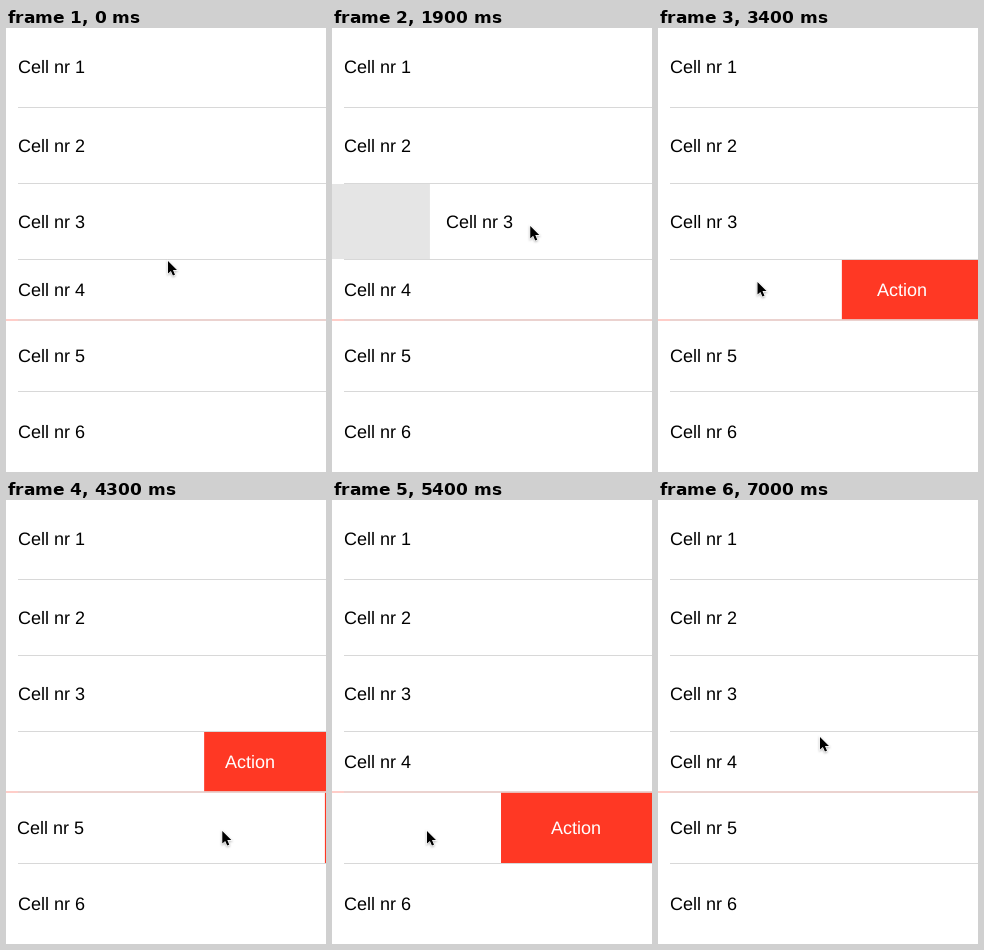
An HTML page for the animation above (7100 ms loop, 320 by 444 pixels).

```html
<!DOCTYPE html>
<html lang="en">
<head>
<meta charset="utf-8">
<title>Swipeable cells</title>
<style>
  html, body { margin: 0; width: 100%; height: 100%; overflow: hidden; background: #fff; }
  svg { display: block; width: 320px; height: 444px; }
  text { font: 18px "Liberation Sans", Arial, sans-serif; text-rendering: geometricPrecision; }
  .label { fill: #000; }
  .action { fill: #fff; }
  #lines rect { fill: #d8d8d8; }
  #cursor { filter: drop-shadow(0 1px 1px rgba(0, 0, 0, .3)); }
</style>
</head>
<body>
<svg viewBox="0 0 320 444">
  <g id="rows"></g>
  <g id="lines"></g>
  <path id="cursor" d="M0 0V12.6L2.9 9.9L4.9 14.6L7 13.7L5 9.1H9Z"
        fill="#000" stroke="#fff" stroke-width="1.2" paint-order="stroke"/>
</svg>
<script>
const LOOP = 7100, STEP = 100, SPRING_RATE = 11.5;
const borders = [-3, 79, 155, 231, 291.5, 363, 443];

const swipes = [
  { row: 2, color: '#e5e5e5', target: 102, open: 1098, close: 2610 },
  { row: 3, color: '#ff3824', target: -151, open: 3060, close: 4230, label: 'Action' },
  { row: 4, color: '#ff3824', target: -151, open: 4289, close: 5570, label: 'Action' }
];

// The pointer eases between these stops.
const stops = [
  { t: 0, x: 162, y: 233 },
  { t: 800, x: 97.5, y: 197 },
  { t: 1300, x: 189, y: 197 },
  { t: 1600, x: 189, y: 197 },
  { t: 2400, x: 219, y: 200 },
  { t: 2900, x: 230, y: 254 },
  { t: 3400, x: 99.5, y: 254 },
  { t: 4100, x: 225, y: 331 },
  { t: 4200, x: 225, y: 331 },
  { t: 4800, x: 95, y: 331 },
  { t: 5500, x: 95, y: 331 },
  { t: 6300, x: 188, y: 316 },
  { t: 7000, x: 162, y: 237 }
];

function add(parent, name, attrs, text = '') {
  const el = document.createElementNS('http://www.w3.org/2000/svg', name);
  for (const key in attrs) el.setAttribute(key, attrs[key]);
  el.textContent = text;
  return parent.appendChild(el);
}

const rows = document.getElementById('rows');
const lines = document.getElementById('lines');
const cursor = document.getElementById('cursor');

function addRow(i) {
  const top = borders[i] + 1, bottom = borders[i + 1], height = bottom - top;
  const baseline = Math.round((borders[i] + bottom) / 2) + 7;
  const swipe = swipes.find(s => s.row === i);
  if (swipe) {
    add(rows, 'rect', { y: top, width: 320, height, fill: swipe.color });
    if (swipe.label) add(rows, 'text', { x: 219, y: baseline, class: 'action' }, swipe.label);
  }
  const cell = add(rows, 'g', {});
  add(cell, 'rect', { x: -4, y: top, width: 324, height, fill: '#fff' });
  add(cell, 'text', { x: 12, y: baseline, class: 'label' }, `Cell nr ${i + 1}`);
  if (i < 5) add(lines, 'rect', { x: 12, y: bottom, width: 308, height: 1 });
  return cell;
}

const cells = Array.from({ length: 6 }, (_, i) => addRow(i));

// Critically damped spring, 0 to 1.
function spring(ms) {
  const p = Math.max(0, ms) / 1000 * SPRING_RATE;
  return 1 - (1 + p) * Math.exp(-p);
}

function pointerAt(t) {
  const i = Math.max(1, stops.findIndex(s => s.t >= t));
  const a = stops[i - 1], b = stops[i];
  const k = (1 - Math.cos(Math.PI * (t - a.t) / (b.t - a.t))) / 2;
  return [a.x + (b.x - a.x) * k, a.y + (b.y - a.y) * k];
}

function draw(now) {
  const t = Math.floor(now % LOOP / STEP) * STEP;
  for (const s of swipes) {
    const amount = spring(t - s.open) * (1 - spring(t - s.close));
    cells[s.row].setAttribute('transform', `translate(${(s.target * amount).toFixed(2)})`);
  }
  cursor.setAttribute('transform', `translate(${pointerAt(t)})`);
}

let start;
function tick(now) {
  start ??= now;
  draw(now - start);
  requestAnimationFrame(tick);
}
draw(0);
requestAnimationFrame(tick);
</script>
</body>
</html>
```
